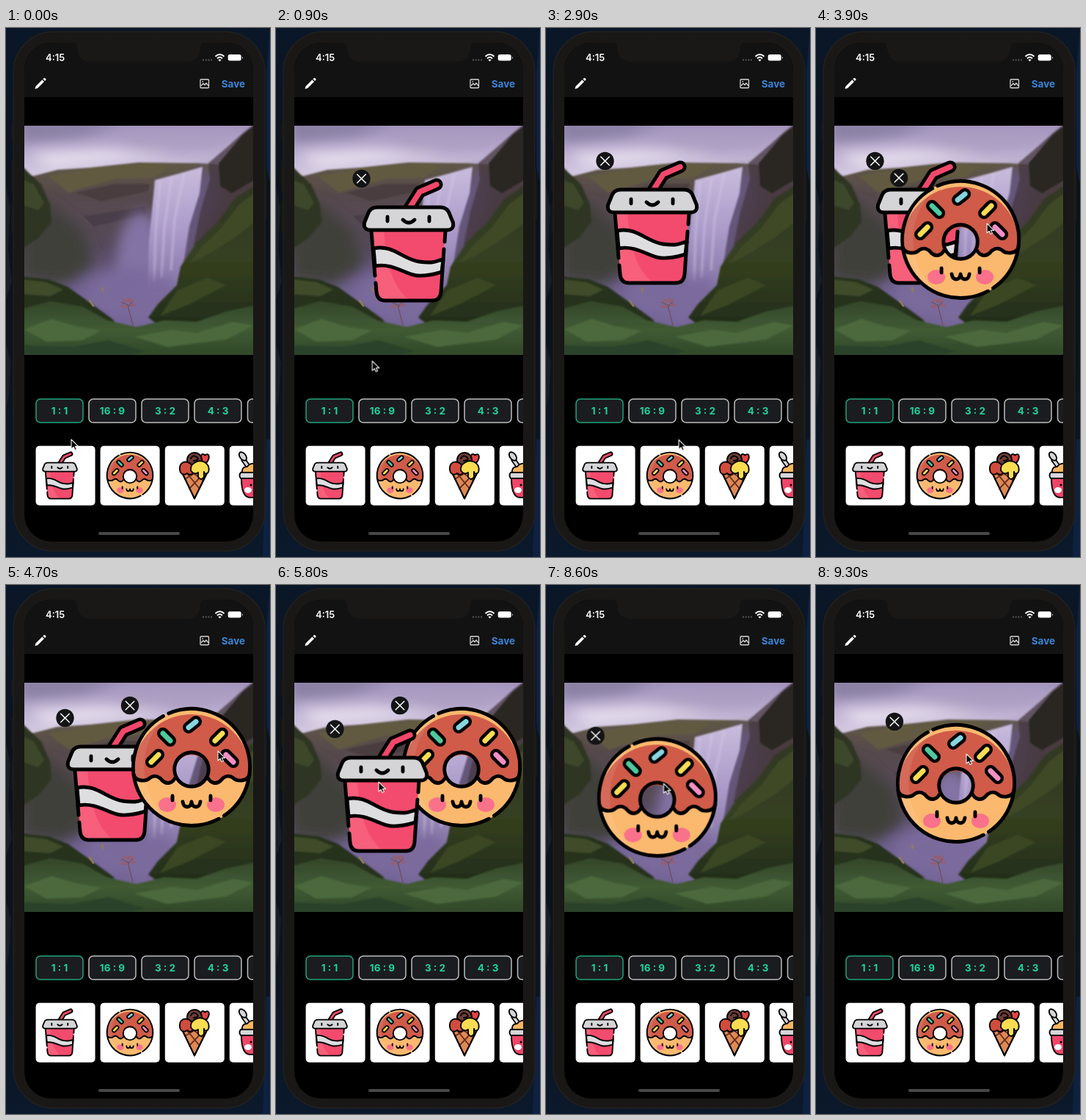
These frames come from a looping animation (360x720 px, 9.4 s). An HTML page:

```html
<!DOCTYPE html>
<html lang="en">
<head>
<meta charset="utf-8">
<title>Sticker editor</title>
<style>
html, body { margin: 0; width: 100%; height: 100%; overflow: hidden; background: #0a121d; }
.stage { position: relative; width: 360px; height: 720px; overflow: hidden; }
svg { position: absolute; left: 0; top: 0; overflow: visible; }
text { font-family: Inter, "Liberation Sans", sans-serif; font-weight: 600; }
.ratio rect { fill: #1b1c20; stroke: #bdbdbd; stroke-width: 1.5; }
.ratio .on { stroke: #1fa57c; }
.ratio text { font-size: 13.5px; font-weight: 700; fill: #1fd39a; text-anchor: middle; }
.ink { fill: none; stroke: #000; stroke-width: 4.9; stroke-linecap: round; stroke-linejoin: round; }

/* Stickers stay inside the photo area */
.canvas { position: absolute; inset: 0; clip-path: inset(133px 23px 275px 25px); }
.cup, .donut, .cursor { animation: 9400ms linear infinite; }
.cup { animation-name: cup-move, cup-show; animation-timing-function: linear, step-end; }
.donut { z-index: 2; animation-name: donut-move, donut-show; animation-timing-function: linear, step-end; }
.cursor { animation-name: cursor-move; }

@keyframes cup-show {
  0% { visibility: hidden; z-index: 1; }
  6.38% { visibility: visible; z-index: 1; }
  57.45% { visibility: visible; z-index: 3; }
  72.34%, 100% { visibility: hidden; z-index: 3; }
}
@keyframes donut-show {
  0% { visibility: hidden; }
  34.04%, 100% { visibility: visible; }
}
@keyframes cup-move {
  0%, 12.77% { transform: translate(181px, 289px); }
  19.15% { transform: translate(142px, 263.5px); }
  21.28%, 57.45% { transform: translate(145px, 265px); }
  61.7% { transform: translate(145px, 280px); }
  64.9%, 100% { transform: translate(126px, 282px); }
}
@keyframes donut-move {
  0%, 39.36% { transform: translate(181px, 288px); }
  41.49% { transform: translate(197px, 288px); }
  48.94%, 81.91% { transform: translate(253px, 248px); }
  90.43% { transform: translate(146px, 292px); }
  98.94%, 100% { transform: translate(191px, 270px); }
}
@keyframes cursor-move {
  0% { transform: translate(89px, 560px); }
  3.19%, 7.45% { transform: translate(80px, 600px); }
  11.7%, 12.77% { transform: translate(182px, 308px); }
  19.15% { transform: translate(144px, 282px); }
  21.28%, 23.4% { transform: translate(147px, 284px); }
  30.85% { transform: translate(181px, 560px); }
  31.91%, 35.11% { transform: translate(178px, 600px); }
  39.36% { transform: translate(217px, 266px); }
  41.49% { transform: translate(233px, 266px); }
  48.94%, 51.06% { transform: translate(289px, 226px); }
  56.38%, 57.45% { transform: translate(140px, 253px); }
  61.7% { transform: translate(140px, 268px); }
  64.9%, 67.02% { transform: translate(121px, 270px); }
  70.21%, 74.47% { transform: translate(61px, 199px); }
  76.6%, 81.91% { transform: translate(257px, 235px); }
  90.43% { transform: translate(154px, 276px); }
  98.94%, 100% { transform: translate(205px, 230px); }
}
</style>
</head>
<body>
<div class="stage">
<svg width="360" height="720" viewBox="0 0 360 720">
  <defs>
    <linearGradient id="desk" x2="0" y2="1">
      <stop stop-color="#0a1728"/><stop offset=".3" stop-color="#0b121b"/>
      <stop offset=".65" stop-color="#0c131c"/><stop offset="1" stop-color="#0b192c"/>
    </linearGradient>
    <linearGradient id="sky" x2="0" y2="1">
      <stop stop-color="#a294bc"/><stop offset=".1" stop-color="#b6a8cc"/><stop offset=".2" stop-color="#d0c5de"/>
    </linearGradient>
    <linearGradient id="wall" x2="0" y2="1">
      <stop stop-color="#5f5844"/><stop offset=".17" stop-color="#57494d"/>
      <stop offset=".42" stop-color="#54485a"/><stop offset=".7" stop-color="#75669a"/><stop offset="1" stop-color="#6d5f8c"/>
    </linearGradient>
    <linearGradient id="fall" x2="0" y2="1">
      <stop stop-color="#c9bcdc"/><stop offset=".5" stop-color="#ab9bca"/><stop offset="1" stop-color="#8373a5"/>
    </linearGradient>
    <linearGradient id="mound" x2="0" y2="1">
      <stop stop-color="#303721"/><stop offset=".5" stop-color="#354020"/><stop offset="1" stop-color="#202b18"/>
    </linearGradient>
    <linearGradient id="grass" x2="0" y2="1">
      <stop stop-color="#34472a"/><stop offset=".5" stop-color="#405b34"/><stop offset="1" stop-color="#2d4527"/>
    </linearGradient>
    <filter id="soft"><feGaussianBlur stdDeviation="1.3"/></filter>
    <filter id="haze" x="-40%" y="-40%" width="180%" height="180%"><feGaussianBlur stdDeviation="9"/></filter>
    <clipPath id="photo"><path d="M25 133H337V445H25z"/></clipPath>
    <clipPath id="screen"><rect x="25" y="20" width="312" height="679" rx="37"/></clipPath>

    <g id="cup">
      <path class="ink" d="M1-44 15-66 38-76" style="stroke-width:17"/>
      <path d="M1-44 15-66 38-76" fill="none" stroke="#f0486a" stroke-width="7.4" stroke-linecap="round" stroke-linejoin="round"/>
      <path d="M-50-15H50L44 70Q43 82 32 82H-32Q-43 82-44 70z" fill="#f34b6d"/>
      <path d="M-50-15H-34Q-30 60 2 82H-32Q-43 82-44 70z" fill="#f75f7b"/>
      <path class="ink" d="M-48 11C-22 5-8 26 14 29S36 28 47 26L45 43C38 45 28 49 12 48S-22 30-46 35z" style="fill:#dedee1"/>
      <path class="ink" d="M-51-13-46 48M-45 58-44 70Q-43 82-32 82H32Q43 82 44 70L48 12M49 2 50-13"/>
      <path class="ink" d="M-43-45H43Q53-45 56-35L60.5-24Q62-14 52-14H-52Q-62-14-60.5-24L-56-35Q-53-45-43-45z" style="fill:#d5d5d8"/>
      <path class="ink" d="M-29-32V-26M28-32V-26M-8-28Q0-20 8-28"/>
    </g>

    <g id="donut">
      <path fill="#fab96e" fill-rule="evenodd" d="M-80 0A80 80 0 1 1 80 0A80 80 0 1 1-80 0M-23 3A23 23 0 1 0 23 3A23 23 0 1 0-23 3"/>
      <path fill="#d05b49" d="M-80 8A80 80 0 1 1 80 8C76 20 62 20 56 14C50 10 44 13 40 18C34 24 26 22 22 13A23 23 0 1 0-22 13C-26 22-34 24-40 18C-44 13-50 10-56 14C-62 20-76 20-80 8z"/>
      <path d="M-28-75A80 80 0 0 0-28 75A95 95 0 0 1-28-75" fill="#fff" opacity=".09"/>
      <path class="ink" d="M-79 10C-76 20-62 20-56 14C-50 10-44 13-40 18C-34 24-26 22-22 14M79 10C76 20 62 20 56 14C50 10 44 13 40 18C34 24 26 22 22 14"/>
      <circle class="ink" cy="3" r="23.3"/>
      <circle class="ink" r="79.5" pathLength="360" stroke-dasharray="179 6 169 6" transform="rotate(62)"/>
      <g fill="none" stroke-linecap="round">
        <path d="M-4-54 6-62M-39-46-29-36M32-36 42-46M-55-7-45-17M47-17 57-7" stroke="#000" stroke-width="16"/>
        <g stroke-width="7">
          <path d="M-4-54 6-62" stroke="#86d5df"/>
          <path d="M-39-46-29-36" stroke="#4fc89f"/>
          <path d="M32-36 42-46M-55-7-45-17" stroke="#f8dd52"/>
          <path d="M47-17 57-7" stroke="#f48fc4"/>
        </g>
      </g>
      <g fill="#f9718a"><ellipse cx="-33" cy="51" rx="12" ry="10"/><ellipse cx="33" cy="51" rx="12" ry="10"/></g>
      <path class="ink" d="M-26 39V45M26 39V45M-12 47Q-11 54-6 54T0 47Q1 54 6 54T12 47"/>
    </g>

    <g id="close">
      <circle r="12.2" fill="#141416"/>
      <path d="M-5.8-5.8 5.8 5.8M5.8-5.8-5.8 5.8" stroke="#fff" stroke-width="1.5" stroke-linecap="round"/>
    </g>
  </defs>

  <!-- Desktop and phone -->
  <path d="M0 0H360V720H0z" fill="url(#desk)"/>
  <path d="M0 215 6 245 3 300 8 345 0 370zM0 430 7 455 4 500 0 520z" fill="#171e27"/>
  <path d="M360 0V210L355 190V60zM355 560H360V720H350z" fill="#0f2140"/>
  <path d="M8.5 128V152M8.5 181V222M8.5 237V279M354.5 193V262" stroke="#15171a" stroke-width="3"/>
  <rect x="10" y="5" width="343" height="707" rx="55" fill="#191816" stroke="#22211e" stroke-width="1.5"/>
  <rect x="25" y="20" width="312" height="679" rx="37"/>
  <path d="M25 20H337V94H25z" fill="#121212" clip-path="url(#screen)"/>
  <path d="M90 19Q97 20 97 27Q98 46 116 46H246Q264 46 265 27Q265 20 272 19z" fill="#191816"/>

  <!-- Status bar and toolbar -->
  <text x="54" y="45" font-size="13" fill="#fff">4:15</text>
  <path d="M268 43.5H281" stroke="#555" stroke-width="2" stroke-dasharray="2 1.7"/>
  <path d="M285.5 38.7Q291.5 33.2 297.5 38.7M288 41.4Q291.5 38.2 295 41.4" fill="none" stroke="#fff" stroke-width="2"/>
  <path d="M289.4 43.2Q291.5 41.6 293.6 43.2L291.5 45.4z" fill="#fff"/>
  <rect x="302.7" y="36" width="18" height="8.6" rx="2.5" fill="#fff"/>
  <path d="M322 39Q324 40.5 322 42z" fill="#ccc"/>
  <path d="M39.5 83 40.4 79.5 49.4 70.5 52 73.1 43 82.1zM50.4 69.5 51.6 68.3Q52.6 67.5 53.5 68.4L54.3 69.2Q55 70 54.2 70.9L53 72.1z" fill="#fff"/>
  <g fill="none" stroke="#d8d8d8" stroke-width="1.3">
    <rect x="265" y="70" width="11.5" height="11.5" rx="1"/>
    <path d="M266 78.5 269 75.5 271 77.5 273 75 276 78.5M267.5 73H269"/>
  </g>
  <text x="293.7" y="80.8" font-size="13.5" fill="#3a84d6" style="font-weight:700">Save</text>

  <!-- Photo -->
  <g clip-path="url(#photo)">
    <path d="M25 133H337V445H25z" fill="url(#sky)"/>
    <g filter="url(#haze)">
      <path d="M20 125H160L110 146 20 156z" fill="#887fa2"/>
      <path d="M150 150 310 140 285 160 180 166z" fill="#aa9dc0"/>
      <path d="M30 172 130 166 230 174 60 190z" fill="#eae2f0"/>
    </g>
    <g filter="url(#soft)">
      <path d="M20 206 70 193 115 190 180 183 262 184 345 190V450H20z" fill="url(#wall)"/>
      <path d="M58 202 125 190 200 185 225 188 203 203 150 205 85 224z" fill="#625a40"/>
      <path d="M95 224 150 212 196 212 194 222 130 236z" fill="#493c40"/>
      <path d="M105 256 190 243 192 254 120 270z" fill="#4a3e48"/>
    </g>
    <g filter="url(#haze)">
      <path d="M20 230 62 240 105 275 120 322 80 350 20 345z" fill="#40403a"/>
      <path d="M256 195 292 190 290 240 268 280 235 340 225 300z" fill="#65577a"/>
      <ellipse cx="184" cy="325" rx="34" ry="75" fill="#8273a4"/>
      <ellipse cx="170" cy="360" rx="62" ry="34" fill="#7a6a9c"/>
    </g>
    <g filter="url(#soft)">
      <path d="M203 207 236 198 268 189 264 225 250 270 242 320 230 360H193L195 290z" fill="url(#fall)"/>
      <path d="M210 208 204 280 202 345M226 203 216 270 212 340M243 198 230 260 225 330" fill="none" stroke="#d5c9e4" stroke-width="4" opacity=".35"/>
      <path d="M342 128 324 142 304 160 276 184 278 206 265 250 256 296 342 300z" fill="#43373f" opacity=".75"/>
      <path d="M342 130 322 146 302 170 290 184 292 215 308 225 342 205z" fill="#2b2824"/>
      <path d="M20 186 32 198 48 213 60 240 62 264 45 285 20 302z" fill="#2e3521"/>
      <path d="M20 205 38 213 52 238 44 248 20 240z" fill="#3e472a"/>
    </g>
    <ellipse cx="206" cy="366" rx="30" ry="28" fill="#7b6b9d" filter="url(#haze)"/>
    <g filter="url(#soft)">
      <path d="M342 212 312 232 288 265 260 292 238 325 233 350 207 376 194 394 222 415 342 410z" fill="url(#mound)"/>
      <path d="M342 222 318 240 294 272 266 299 250 320 272 310 312 285 342 262z" fill="#404a26"/>
      <path d="M234 357 275 340 300 350 250 376 210 392z" fill="#3a4724"/>
      <path d="M20 338 58 342 84 352 112 372 145 396 160 415H20z" fill="#27331e"/>
      <path d="M20 342 55 346 78 356 60 365 20 362z" fill="#3f4c2a"/>
      <path d="M20 383 60 372 104 379 138 398 178 407 215 398 260 400 300 386 342 377V450H20z" fill="url(#grass)"/>
      <path d="M25 410 62 396 95 406 130 412 104 425 55 427zM175 420 226 411 260 415 310 400 337 405 300 424 220 434z" fill="#4b693c"/>
      <path d="M25 432 90 434 140 425 190 440 150 450H25z" fill="#2b432a"/>
    </g>
    <path d="M173 405 166 377 157 373M166 380 174 371" fill="none" stroke="#704f5d" stroke-width="1.3"/>
    <g fill="#8f6079"><ellipse cx="167" cy="371" rx="8" ry="3"/><ellipse cx="161" cy="379" rx="5" ry="2.2"/><ellipse cx="173" cy="377" rx="4" ry="2"/></g>
    <path d="M114 371 119 378M131 354 132 358" stroke="#8d7a5c" stroke-width="3" stroke-linecap="round"/>
  </g>

  <!-- Ratio buttons and sticker cards -->
  <g clip-path="url(#screen)">
    <g class="ratio">
      <rect class="on" x="41" y="505" width="64" height="32" rx="6"/><text x="73" y="526">1 : 1</text>
      <rect x="113" y="505" width="64" height="32" rx="6"/><text x="145" y="526">16 : 9</text>
      <rect x="185" y="505" width="64" height="32" rx="6"/><text x="217" y="526">3 : 2</text>
      <rect x="257" y="505" width="64" height="32" rx="6"/><text x="289" y="526">4 : 3</text>
      <rect x="329.5" y="505" width="64" height="32" rx="6"/>
    </g>
    <g fill="#fff">
      <rect x="40.6" y="568.7" width="81" height="81" rx="5"/><rect x="128.6" y="568.7" width="81" height="81" rx="5"/>
      <rect x="216.8" y="568.7" width="81" height="81" rx="5"/><rect x="304.8" y="568.7" width="81" height="81" rx="5"/>
    </g>
    <use href="#cup" transform="translate(73.5 609) scale(.385)"/>
    <use href="#donut" transform="translate(169 609) scale(.394)"/>
    <g stroke="#000" stroke-width="1.9" stroke-linejoin="round" stroke-linecap="round">
      <path d="M239.5 604H275L257 640.5z" fill="#df8a54"/>
      <path d="M245 604 264 627M256 606 269 616M270 606 250 627M257 606 244 614" fill="none" stroke="#6b2f20"/>
      <path d="M239.5 604H275L257 640.5z" fill="none"/>
      <path d="M267 590C263 583 267 577 271.5 581.5C276 577 280 584 273 592z" fill="#e04444"/>
      <circle cx="257" cy="588" r="10" fill="#703d38"/>
      <path d="M252 586Q255 580 260 584T256 589" fill="none"/>
      <path d="M238 605C234 594 241 589 248 591C254 593 256 598 255 606Q251 610 247 606Q242 610 238 605z" fill="#d04c3e"/>
      <path d="M252 602C251 591 264 587 271 591C279 596 277 605 274 606Q271 608 270 604V611Q266 617 262 611V605Q256 609 252 602z" fill="#f8dd52"/>
      <path d="M324 588 337 606" stroke-width="7"/><path d="M324 588 337 606" stroke="#d5d5d8" stroke-width="3.6"/>
      <ellipse cx="323" cy="583" rx="4" ry="6.6" transform="rotate(-38 323 583)" fill="#d5d5d8"/>
      <path d="M322 606Q321 597 329 597Q333 591 345 593V608H322z" fill="#f7b65f"/>
      <path d="M320 605H345V613H320Q317 609 320 605z" fill="#d6d6da"/>
      <path d="M321 613H345V639H332Q321 638 321 613z" fill="#ef4569"/>
    </g>
    <ellipse cx="330" cy="629" rx="5" ry="4" fill="#fff"/>
    <circle cx="334" cy="622" r="1.5"/>
    <rect x="126" y="686" width="111" height="4" rx="2" fill="#484848"/>
  </g>
  <path d="M337 490H352V655H337z" fill="#191816"/>
</svg>

<div class="canvas">
  <svg class="cup" width="1" height="1"><use href="#cup"/><use href="#close" x="-64.5" y="-84"/></svg>
  <svg class="donut" width="1" height="1"><use href="#donut"/><use href="#close" x="-84" y="-84"/></svg>
</div>

<svg class="cursor" width="1" height="1">
  <path d="M0 0V13L3.1 10.3 5.1 14.6 7.4 13.5 5.4 9.4H9.6z" fill="#050505" stroke="#eee" stroke-width="1.1" stroke-linejoin="round"/>
</svg>
</div>
</body>
</html>
```
